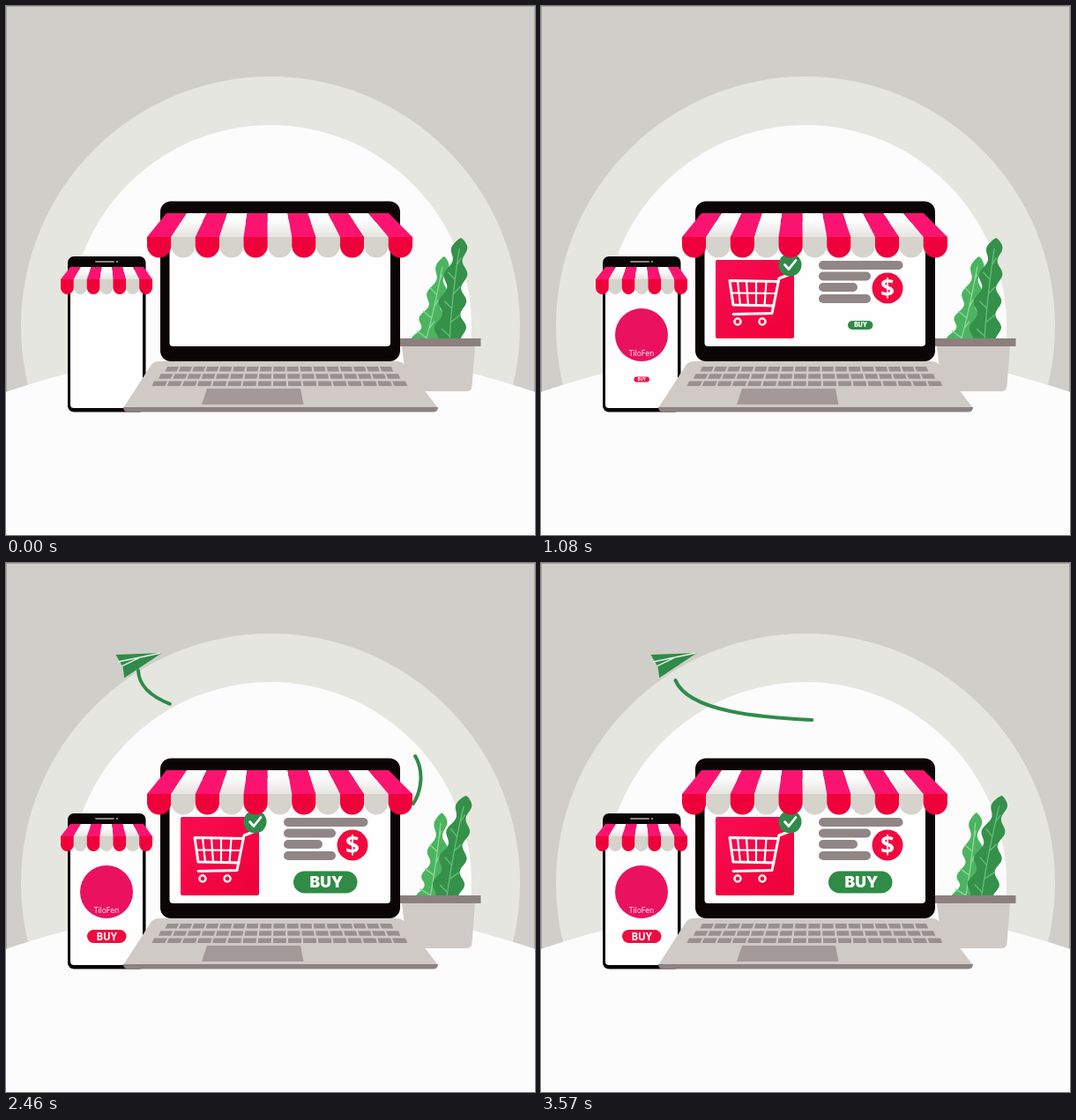
Write an HTML page that moves like this. It is 600 px wide and 600 px high and loops after 3600 ms.

```html
<!DOCTYPE html>
<html lang="en">
<head>
<meta charset="utf-8">
<title>Online shop</title>
<style>
html, body { margin: 0; width: 100%; height: 100%; overflow: hidden; background: #d0cec9; }
svg { display: block; width: 100vw; height: 100vh; }
text { fill: #fff; text-anchor: middle; }
.line { fill: none; stroke-linecap: round; stroke-linejoin: round; }
</style>
</head>
<body>
<svg viewBox="0 0 600 600" xmlns="http://www.w3.org/2000/svg">
  <defs>
    <linearGradient id="red" x1="0" y1="0" x2="1" y2="1">
      <stop offset="0" stop-color="#f80d52"/><stop offset="1" stop-color="#ef0038"/>
    </linearGradient>
    <linearGradient id="pale" x1="0" y1="0" x2="0" y2="1">
      <stop offset=".3" stop-color="#fdfdfd"/><stop offset="1" stop-color="#e6e4df"/>
    </linearGradient>
  </defs>

  <rect x=".5" y=".5" width="599" height="599" fill="#d0cec9" stroke="#a6a49e"/>
  <circle cx="300" cy="363" r="283" fill="#e5e6e0"/>
  <circle cx="300" cy="363" r="228" fill="#fcfcfc"/>
  <circle cx="300" cy="1316" r="928" fill="#fcfcfc"/>

  <path id="trail" class="line" pathLength="403" stroke="#2f8b49" stroke-width="4"/>
  <path id="flight" fill="none"/>
  <g id="plane" fill="#2f8b49">
    <path d="M25 -7L-24 7.600L-22 -5L-25.700 -20.500Z"/>
    <path d="M23 -7.300L-25 -11.800M-2 -9L-22 -6" class="line" stroke="#e9efe8" stroke-width="1.400"/>
  </g>

  <g id="leafA"></g>
  <g id="leafB"></g>
  <path d="M449 385H532L528.500 431Q528 437 522 437H455Z" fill="#d0cac7"/>
  <rect x="444" y="377" width="94.500" height="9" fill="#8b807e"/>

  <rect x="70" y="284" width="88.500" height="176.500" rx="7" fill="#090506"/>
  <rect x="73" y="300" width="82" height="156" rx="4" fill="#fefefe"/>
  <rect x="101" y="289" width="22" height="2" rx="1" fill="#8b8281"/>
  <circle cx="126" cy="290" r="1.200" fill="#8b8281"/>
  <g id="logo">
    <circle cx="114" cy="373" r="30" fill="#ea125e"/>
    <text x="114" y="397" font-family="Open Sans, sans-serif" font-size="8.500">TiloFen</text>
  </g>
  <g id="buyS">
    <rect x="92" y="416" width="44.500" height="15" rx="7.500" fill="#ee0c3f"/>
    <text x="114.200" y="427.500" font-family="Open Sans, sans-serif" font-weight="700" font-size="11.500">BUY</text>
  </g>
  <g id="awnS"></g>

  <rect x="175" y="221.500" width="272" height="181.500" rx="12" fill="#0b0506"/>
  <rect x="185.500" y="245" width="250.500" height="141" rx="4" fill="#fefefe"/>
  <rect id="tile" x="198" y="288" width="89" height="89" rx="2" fill="url(#red)"/>
  <g id="cart">
    <g class="line" stroke="#fff" stroke-width="3">
      <path d="M283 304L270 309L262 348.500L218 349.500"/>
      <path d="M268.500 312.500L214 311.500L218 339L264 340"/>
      <path d="M223 312L226 339M233 312L235 339.500M244 312V340M255.500 312.500L253.500 340M216 325.500L266 326" stroke-width="2.200"/>
      <circle cx="223" cy="358" r="3.600" stroke-width="2.300"/>
      <circle cx="251" cy="358" r="3.600" stroke-width="2.300"/>
    </g>
    <circle cx="282.500" cy="293.500" r="13" fill="#2f8b49"/>
    <path d="M276.500 293.500L281 298.500L289 288.500" class="line" stroke="#fff" stroke-width="2.800"/>
  </g>
  <g id="lines" fill="#8f8685">
    <rect x="315" y="289" width="95.500" height="10" rx="5"/>
    <rect x="315" y="301.500" width="59" height="10" rx="5"/>
    <rect x="315" y="314" width="44" height="10" rx="5"/>
    <rect x="315" y="327" width="59" height="10" rx="5"/>
  </g>
  <g id="price">
    <circle cx="393" cy="320" r="17.500" fill="#f2083f"/>
    <text x="393" y="330" font-family="Open Sans, sans-serif" font-weight="700" font-size="28">$</text>
  </g>
  <g id="buyL">
    <rect x="326" y="349.500" width="72.500" height="25" rx="12.500" fill="#2f8b46"/>
    <text x="363.500" y="368" font-family="Inter, sans-serif" font-weight="900" font-size="17.500">BUY</text>
  </g>
  <g id="awnL"></g>

  <path d="M133 456L164 408Q167 403 174 403H443Q449 403 453 408L490 456Z" fill="#d0cac7"/>
  <path d="M133 455H490Q490 460.500 484 460.500H139Q133 460.500 133 455Z" fill="#8b8281"/>
  <g id="keys" fill="#989090"></g>
  <path d="M228 434H334L337.500 452H222Z" fill="#a29998"/>
</svg>
<script>
const LOOP = 3600;
const $ = id => document.getElementById(id);
const clamp = (v, a, b) => Math.min(b, Math.max(a, v));
const mix = (a, b, u) => a + (b - a) * u;
const range = n => Array.from({ length: n }, (_, i) => i);

function awning(id, n, top, hinge, yTop, yHinge, yEnd) {
  const r = (hinge[1] - hinge[0]) / n / 2;
  $(id).innerHTML = range(n).map(i => {
    const a = mix(...hinge, i / n), b = mix(...hinge, (i + 1) / n), pink = i % 2 === 0;
    return `<path d="M${mix(...top, i / n)} ${yTop}H${mix(...top, (i + 1) / n)}L${b} ${yHinge}H${a}Z" fill="${pink ? '#fa1470' : 'url(#pale)'}"/>`
      + `<path d="M${a} ${yHinge}H${b}V${yEnd - r}A${r} ${r} 0 0 1 ${a} ${yEnd - r}Z" fill="${pink ? '#ef003a' : '#d5d3cb'}"/>`;
  }).join('');
}

// wavy leaf around a curved spine, narrowing from wide to slim
function leaf(id, fill, vein, [base, bend, tip], wide, slim, wave) {
  const at = (u, k) => mix(mix(base[k], bend[k], u), mix(bend[k], tip[k], u), u);
  const half = u => (mix(wide, slim, u) + 3.3 * Math.cos(2 * Math.PI * (u - .92) / wave)) * Math.sqrt(1 - u ** 12);
  const side = (u, s) => `${at(u, 0) + s * half(u)} ${at(u, 1)}`;
  const us = range(61).map(i => i / 60);
  const edge = [...us.map(u => side(u, 1)), ...us.reverse().map(u => side(u, -1))];
  const rib = us.slice(6).map(u => `${at(u, 0)} ${at(u, 1)}`);
  const twigs = range(6).map(i => {
    const u = .05 + i * .14, s = i % 2 ? 1 : -1;
    return `M${at(u, 0)} ${at(u, 1)}L${at(u, 0) + s * half(u) * .65} ${at(u, 1) - 8}`;
  });
  $(id).innerHTML = `<path d="M${edge.join('L')}Z" fill="${fill}"/>`
    + `<path d="M${rib.join('L')}${twigs.join('')}" class="line" stroke="${vein}" stroke-width="1.3"/>`;
}

function keyboard(rows, cols) {
  let out = '';
  for (const r of range(rows)) {
    const left = 182 - 7.5 * r, w = (256 + 15.5 * r) / cols, y = 409 + 8.3 * r;
    for (const i of range(cols)) {
      out += `<path d="M${left + i * w + 1} ${y}h${w - 2}l${(i - cols / 2) * .3} 5.5h${2 - w}Z"/>`;
    }
  }
  $('keys').innerHTML = out;
}

awning('awnS', 7, [73, 156], [62, 166], 296, 310, 327);
awning('awnL', 11, [182, 434], [160, 461], 235, 262, 285.5);
keyboard(3, 17);
leaf('leafA', '#4bb45f', '#8ed79b', [[476, 380], [486, 345], [497, 284]], 14, 5, .29);
leaf('leafB', '#35904a', '#64c078', [[503, 380], [506, 325], [516, 263]], 16, 7, .26);

const route = '462 273C478 247 474 206 427 192C390 181 350 181 308 178C245 175 152 168 150 122';
const flight = $('flight');
$('trail').setAttribute('d', 'M' + route);
flight.setAttribute('d', `M400 320C430 312 452 291 ${route}C150 119 151 117 155 116`);
const flightLen = flight.getTotalLength();

// grows evenly to a peak, then settles at 1
function pop(t, start, rise, peak, settle) {
  const e = t - start;
  if (e <= 0) return 0;
  return e < rise ? peak * e / rise : mix(peak, 1, clamp((e - rise) / settle, 0, 1));
}

const bump = (t, mid, half) => Math.max(0, 1 - Math.abs(t - mid) / half);

function scale(id, x, y, s) {
  const el = $(id);
  el.style.display = s > 0 ? '' : 'none';
  el.setAttribute('transform', `translate(${x} ${y}) scale(${s}) translate(${-x} ${-y})`);
}

function drawPlane(t) {
  const d = clamp(flightLen - (2400 - t) * .37, 0, flightLen);
  $('plane').style.display = d > 0 ? '' : 'none';
  if (d <= 0) return;
  const p = flight.getPointAtLength(d), q = flight.getPointAtLength(Math.max(0, d - 1));
  const dir = (Math.atan2(p.y - q.y, p.x - q.x) * 180 / Math.PI + 364) % 360;
  const u = clamp((d - flightLen + 45) / 45, 0, 1);
  $('plane').setAttribute('transform', `translate(${p.x} ${p.y}) rotate(${mix(dir, 343, u * u * (3 - 2 * u))})`);
}

// a dash that swells while it runs round and round the path
function drawTrail(t) {
  const mid = 403 + .64 * (t - 2460);
  const reach = 92 * Math.max(0, Math.sin(Math.PI * (t - 1720) / 3000)) ** 1.4;
  const tail = Math.max(0, mid - reach), len = mid + reach - tail;
  const el = $('trail');
  el.style.display = len > 0 ? '' : 'none';
  el.setAttribute('stroke-dasharray', `${len} ${403 - len}`);
  el.setAttribute('stroke-dashoffset', -(tail % 403));
}

function draw(t) {
  scale('tile', 242.5, 332.5, pop(t, 120, 220, 1.1, 120));
  scale('logo', 114, 373, pop(t, 325, 275, 1.15, 150));
  scale('cart', 250, 316, pop(t, 325, 275, 1.24, 150));
  scale('lines', 362, 312, pop(t, 460, 285, 1.2, 150));
  scale('price', 393, 320, pop(t, 720, 220, 1.2, 130));
  const buy = pop(t, 990, 320, 1.38, 180) + .38 * (bump(t, 1890, 210) + bump(t, 2920, 180));
  scale('buyS', 114.2, 423.5, buy);
  scale('buyL', 362.2, 362, buy);

  const sway = 2.5 * (1 - Math.cos(t / 1030 * 2 * Math.PI));
  $('leafA').setAttribute('transform', `rotate(${-sway} 485 320)`);
  $('leafB').setAttribute('transform', `rotate(${sway} 510 340)`);
  drawPlane(t);
  drawTrail(t);
}

const begin = performance.now();
function frame(now) {
  draw(Math.max(0, now - begin) % LOOP);
  requestAnimationFrame(frame);
}
draw(0);
requestAnimationFrame(frame);
</script>
</body>
</html>
```
